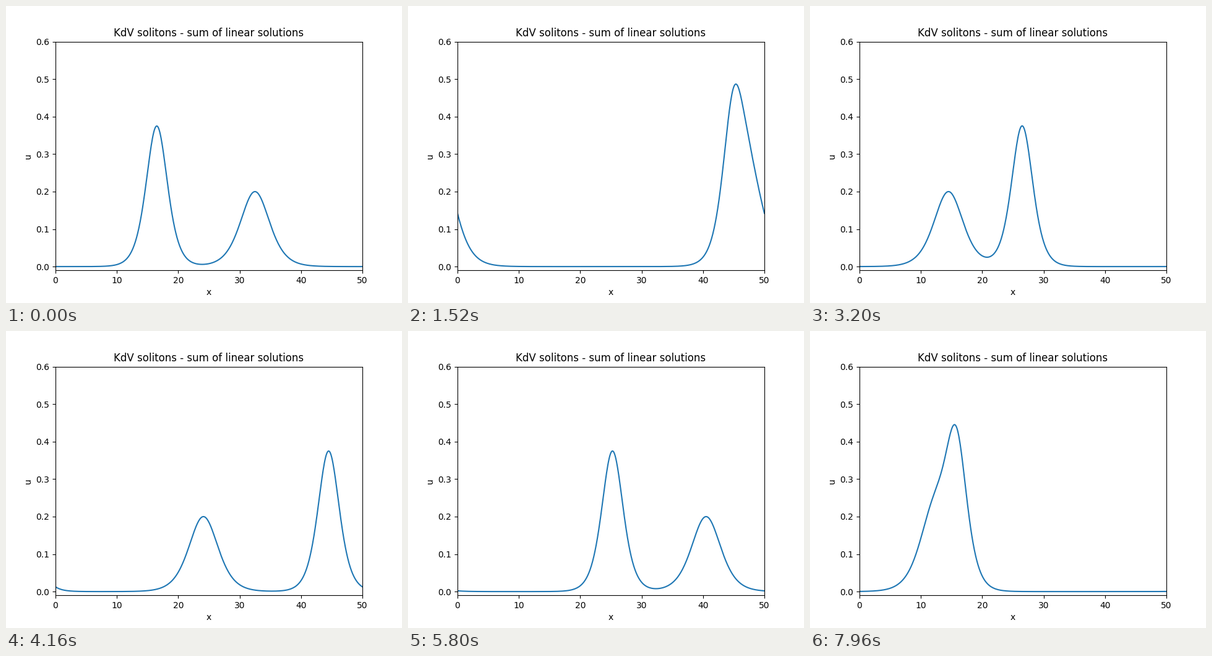
Animation of 640 by 480 pixels, one loop 8 s. Source, as a matplotlib script:

```python
import numpy as np
import matplotlib.pyplot as plt
from matplotlib.animation import FuncAnimation

LENGTH = 50.0
FRAMES = 200
INTERVAL = 40  # ms
SOLITONS = [(0.75, 0.33 * LENGTH), (0.40, 0.65 * LENGTH)]  # (speed, start)

x = np.linspace(0, LENGTH, 501)


def soliton(x, t, c, x0):
    """One travelling pulse on a periodic domain."""
    center = (x0 + c * t) % LENGTH
    images = center + LENGTH * np.array([-1, 0, 1])
    phase = 0.5 * np.sqrt(c) * (x[:, None] - images)
    return (0.5 * c / np.cosh(phase) ** 2).sum(axis=1)


def wave(t):
    return sum(soliton(x, t, c, x0) for c, x0 in SOLITONS)


plt.rcParams["font.family"] = "DejaVu Sans"
fig, ax = plt.subplots(figsize=(6.4, 4.8), dpi=100)
ax.set(xlim=(0, LENGTH), ylim=(-0.01, 0.6), xlabel="x", ylabel="u",
       title="KdV solitons - sum of linear solutions")
line, = ax.plot(x, wave(0), color="#1f77b4", lw=1.5)


def update(frame):
    line.set_ydata(wave(frame))
    return line,


anim = FuncAnimation(fig, update, frames=FRAMES, interval=INTERVAL,
                     repeat=True, repeat_delay=0)
plt.show()
```
